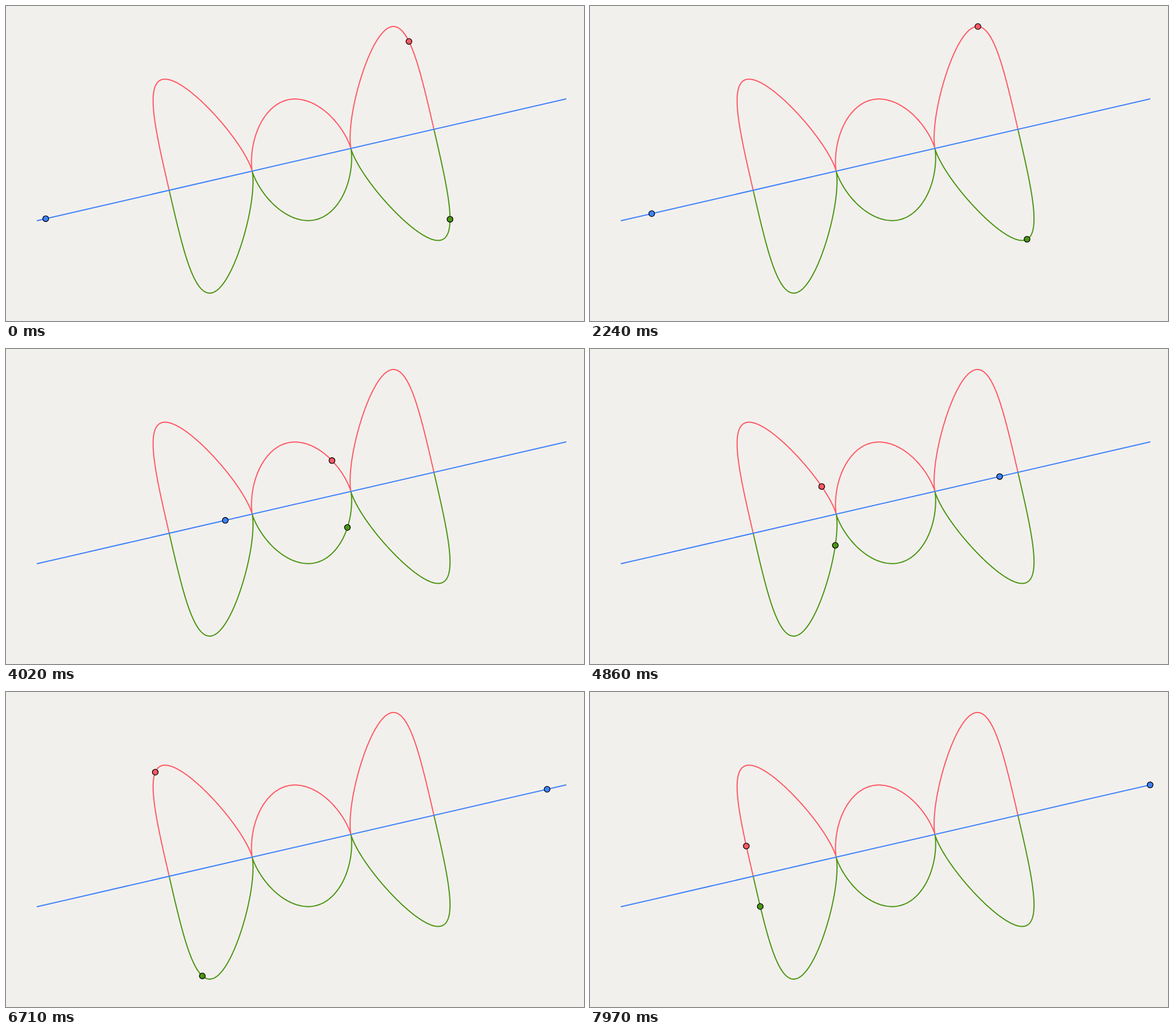
An HTML page for the animation above (7.99 s loop, 1013x553 px).

```html
<!DOCTYPE html>
<html lang="en">
<head>
<meta charset="utf-8">
<title>Three bodies</title>
<style>
  html, body { margin: 0; width: 100%; height: 100%; overflow: hidden; background: #f2f0ed; }
  svg { display: block; width: 1013px; height: 553px; }
  path { fill: none; stroke-width: 2; stroke-linejoin: round; }
  circle { stroke: #000; stroke-width: 1.3; r: 5.1px; }
</style>
</head>
<body>
<svg viewBox="0 0 1013 553">
  <path id="greenPath" stroke="#4a9612"/>
  <path id="redPath" stroke="#ff5964"/>
  <path id="bluePath" stroke="#3f82fb"/>
  <circle id="blueDot" r="5.1" fill="#3f82fb"/>
  <circle id="redDot" r="5.1" fill="#ff5964"/>
  <circle id="greenDot" r="5.1" fill="#4a9612"/>
</svg>
<script>
const LOOP = 7990, STEP = 200 / 9, DS = 0.001;
const $ = id => document.getElementById(id);

// Isosceles three-body motion with equal masses. One body sits at b on an axis,
// the other two at -b/2 along it and +-q^2 across it. With dt = q^2 ds the
// pair's collisions become smooth. State: [q, dq/ds, b, db/dt, t].
function slope([q, p, b, c], energy) {
  const v = q * q, d = Math.sqrt(2.25 * b * b + v * v), d3 = d * d * d;
  return [
    p,
    q / 4 * (energy + 2 / d - 0.75 * c * c) - q * v * v / (2 * d3),
    v * c,
    -3 * b * v / d3,
    v
  ];
}

function rk4(y, energy) {
  const move = (k, h) => y.map((n, i) => n + k[i] * h);
  const k1 = slope(y, energy);
  const k2 = slope(move(k1, DS / 2), energy);
  const k3 = slope(move(k2, DS / 2), energy);
  const k4 = slope(move(k3, DS), energy);
  return y.map((n, i) => n + DS / 6 * (k1[i] + 2 * k2[i] + 2 * k3[i] + k4[i]));
}

// Quarter orbit: from the collision at the far end until b reaches the centre.
function quarter(energy) {
  let y = [0, Math.SQRT1_2 / 2, -1, 0, 0], peaks = 0;
  const list = [y];
  while (y[2] < 0 && list.length < 20000) {
    const next = rk4(y, energy);
    if (next[1] * y[1] < 0) peaks++;
    y = next;
    list.push(y);
  }
  return { list, peaks };
}

// The orbit closes when the pair is widest for the second time at the centre.
let low = -3, high = -2;
for (let i = 0; i < 18; i++) {
  const mid = (low + high) / 2;
  if (quarter(mid).peaks >= 2) low = mid; else high = mid;
}
const orbit = quarter((low + high) / 2).list.map(([q, , b, c, t]) => ({ v: q * q, b, c, t }));
const last = orbit[orbit.length - 1];
const half = 2 * (last.t - last.b / last.c);
const timeOf = v => orbit.find(o => o.v >= v).t;

// Clock: the pair's spread at two steps fixes rate and phase.
const startTime = timeOf(0.2151), endTime = half + timeOf(0.1142);
const rate = (endTime - startTime) / 309;

function lookup(t) {
  let lo = 0, hi = orbit.length - 1;
  while (hi - lo > 1) {
    const m = (lo + hi) >> 1;
    if (orbit[m].t > t) hi = m; else lo = m;
  }
  const a = orbit[lo], z = orbit[hi], f = (t - a.t) / (z.t - a.t);
  return { b: a.b + (z.b - a.b) * f, v: a.v + (z.v - a.v) * f };
}

function stateAt(t) {
  t = Math.abs(t);
  if (t > half) t = 2 * half - t;
  if (t <= half / 2) return lookup(t);
  const { b, v } = lookup(half - t);
  return { b: -b, v };
}

const place = (u, v) => [518 + 464 * u - 107 * v, 270 - 107 * u - 464 * v];
const trace = pts => "M" + pts.map(p => p.map(n => n.toFixed(2)).join(" ")).join("L");

const near = orbit.filter((o, i) => i % 12 === 0 && o.b < 0);
const full = near.concat(near.map(o => ({ b: -o.b, v: o.v })).reverse());
$("redPath").setAttribute("d", trace(full.map(o => place(-o.b / 2, o.v))));
$("greenPath").setAttribute("d", trace(full.map(o => place(-o.b / 2, -o.v))));
$("bluePath").setAttribute("d", trace([place(-1, 0), place(1, 0)]));

function put(id, [x, y]) {
  $(id).setAttribute("cx", x.toFixed(2));
  $(id).setAttribute("cy", y.toFixed(2));
}

function draw(ms) {
  const n = Math.floor((ms % LOOP + 8) / STEP);
  const { b, v } = stateAt(startTime + (n - 50) * rate);
  put("blueDot", place(b, 0));
  put("redDot", place(-b / 2, v));
  put("greenDot", place(-b / 2, -v));
}

let begin = null;
function tick(now) {
  if (begin === null) begin = now;
  draw(now - begin);
  requestAnimationFrame(tick);
}
draw(0);
requestAnimationFrame(tick);
</script>
</body>
</html>
```
